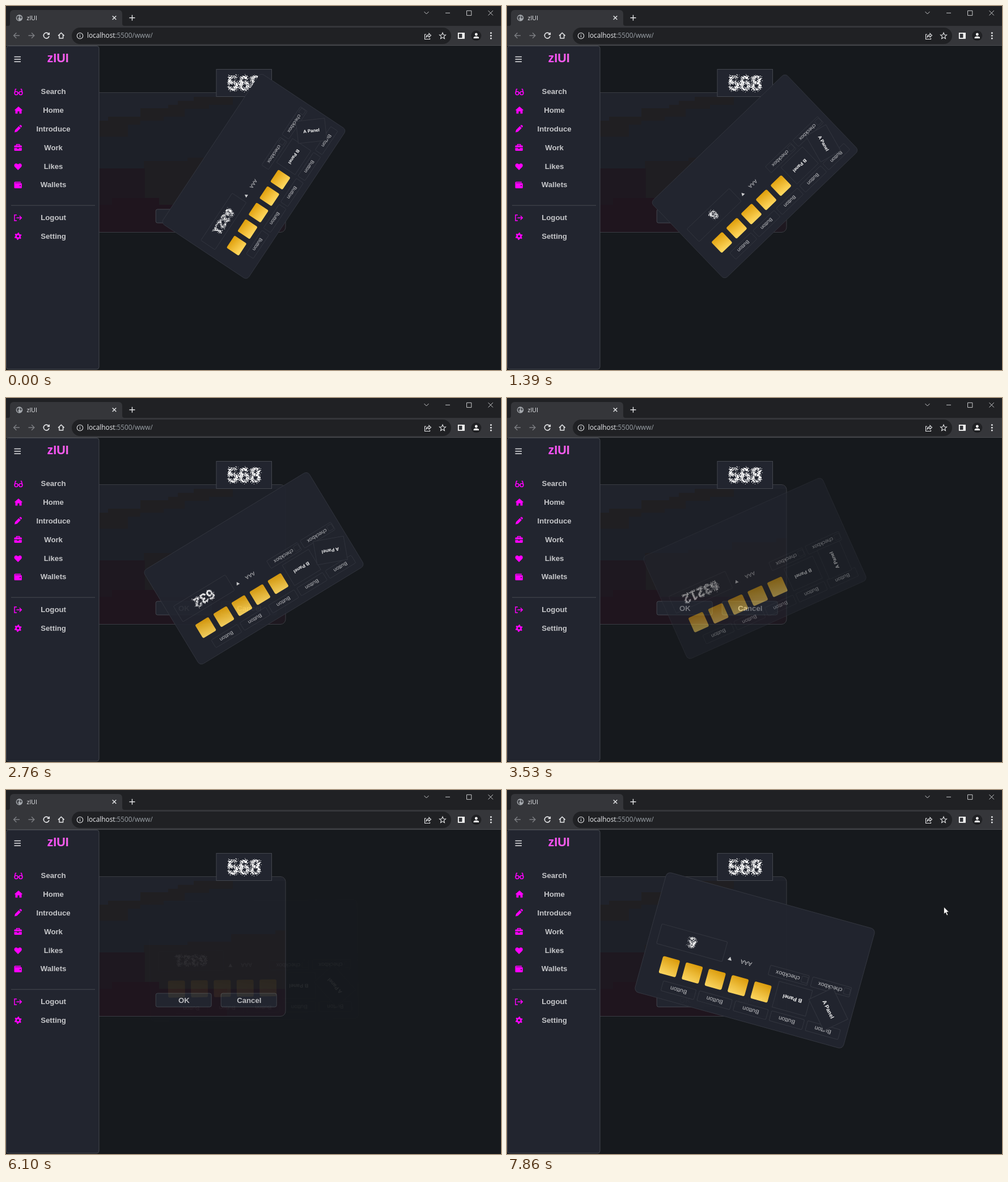
Write an HTML page that moves like this. It is 873 by 641 pixels and loops after 8000 ms.

```html
<!DOCTYPE html>
<html lang="en">
<head>
<meta charset="utf-8">
<title>zIUI</title>
<style>
  html, body { margin: 0; width: 100%; height: 100%; overflow: hidden; background: #16191d; }
  svg { display: block; width: 873px; height: 641px; font-family: "Liberation Sans", Arial, sans-serif; }
  text { text-anchor: middle; dominant-baseline: central; fill: #c6c7ca; }
  .bold { font-weight: bold; }
  .ui { font-family: "Open Sans", "Noto Sans", sans-serif; text-anchor: start; dominant-baseline: auto; }
  .panel { fill: #22252f; stroke: #43464e; }
  .thin { fill: #22252f; stroke: #343740; }
  .line { fill: none; stroke: #e3e4e6; stroke-width: 1.4; }
  .pink { fill: #f0f; }
  .pinkline { fill: none; stroke: #f0f; stroke-width: 1.5; }
  .digits { fill: #fff; font-weight: bold; filter: url(#grain); }
</style>
</head>
<body>
<svg viewBox="0 0 873 641" xmlns="http://www.w3.org/2000/svg">
  <defs>
    <filter id="grain" x="-30%" y="-30%" width="160%" height="160%" color-interpolation-filters="sRGB">
      <feTurbulence type="fractalNoise" baseFrequency="0.9" numOctaves="2" seed="4"/>
      <feDisplacementMap in="SourceGraphic" scale="13" xChannelSelector="R" yChannelSelector="G"/>
    </filter>
    <linearGradient id="gold" x1="0.3" y1="1" x2="0.5" y2="0">
      <stop offset="0" stop-color="#e0a00c"/><stop offset="1" stop-color="#ffd75e"/>
    </linearGradient>
    <linearGradient id="title">
      <stop offset="0" stop-color="#fb4dfb"/><stop offset="1" stop-color="#f662ea"/>
    </linearGradient>
    <clipPath id="dialogClip"><rect x="100" y="153" width="393" height="245" rx="9"/></clipPath>
  </defs>

  <rect width="873" height="641" fill="#16191d"/>

  <!-- dialog -->
  <g clip-path="url(#dialogClip)">
    <rect x="100" y="153" width="393" height="245" fill="#1d2028"/>
    <path d="M100 153H493V160H331V167H303V174H286V180H237V195H180V202H100Z" fill="#20232c"/>
    <path d="M100 202H180V195H237V180H286V174H303V167H331V160H400V174H358V181H315V195H278V202H237V209H215V230H100Z" fill="#201f22"/>
    <path d="M243 273H320V267H397V254H475V247H493V398H243Z" fill="#1f1e22"/>
    <path d="M100 286H245V350H493V398H100Z" fill="#1e1820"/>
    <path d="M100 350H187V338H270V350H390V398H100Z" fill="#1f151e"/>
  </g>
  <rect x="100" y="152.5" width="393" height="246" rx="9" fill="none" stroke="#3a3c42"/>
  <g id="dialogButtons"></g>
  <rect class="panel" x="371" y="111.5" width="97.5" height="48"/>
  <text class="digits" x="420" y="136.5" font-size="36">568</text>

  <g id="card">
    <rect class="thin" x="-190.75" y="-109.25" width="381.5" height="218.5" rx="8"/>
    <g id="cardParts" font-size="10.4"></g>
    <text id="typed" class="digits" x="115" y="1" font-size="26.5"></text>
    <path d="M39.4-11.6H46.6L43-5.4Z" fill="#d0d1d3"/>
    <g id="spinner" class="bold" font-size="9.6">
      <rect class="thin" x="-30.5" y="-23.5" width="61" height="47"/>
      <text style="fill:#fff">A Panel</text>
    </g>
  </g>

  <!-- sidebar -->
  <rect class="panel" x="0.5" y="70.5" width="163.5" height="569" rx="4"/>
  <path class="line" d="M14.5 89.5H26M14.5 93.8H26M14.5 98H26"/>
  <text class="bold" x="91.7" y="92" font-size="21.5" style="fill:url(#title)">zIUI</text>
  <path d="M9 351.2H157" stroke="#474a52"/>
  <g id="menu" class="bold" font-size="13.2"></g>
  <g class="pinkline">
    <circle cx="18" cy="153.5" r="2.9"/><circle cx="26" cy="153.5" r="2.9"/>
    <path d="M15.2 153L16.6 146.6H18.4M28.8 153L27.4 146.6H25.6M20.8 153H23.2"/>
    <path d="M19 368H15V378H19M18.5 373H27M23.8 369.5L27.3 373L23.8 376.5"/>
  </g>
  <g class="pink">
    <path d="M22 177L29.4 183.6H27.5V189.5H23.6V185.5H20.4V189.5H16.5V183.6H14.6Z"/>
    <path d="M15 222.5L16 218.2L22.6 211.6L25.9 214.9L19.3 221.5ZM23.5 210.7L24.8 209.6Q25.8 209 26.8 210L27.5 210.8Q28.4 211.7 27.6 212.8L26.7 214Z"/>
    <path d="M14.5 249V246.8Q14.5 245.6 15.8 245.6H17.8V244Q17.8 243 18.8 243H23.6Q24.6 243 24.6 244V245.6H26.5Q27.8 245.6 27.8 246.8V249ZM19.2 244.4V245.6H23.2V244.4ZM14.5 250H19.4V251.3H22.8V250H27.8V253.8Q27.8 255 26.5 255H15.8Q14.5 255 14.5 253.8Z" fill-rule="evenodd"/>
    <path d="M21.2 289L15.6 283.4C13.4 280.8 15 277.2 18 277.2Q20 277.2 21.2 279Q22.4 277.2 24.4 277.2C27.4 277.2 29 280.8 26.8 283.4Z"/>
    <path d="M16 309.5H26V311.2H16.2V312H26.4Q27.8 312 27.8 313.3V319.7Q27.8 321 26.4 321H16Q14.5 321 14.5 319.5V311Q14.5 309.5 16 309.5Z"/>
    <g id="gear"></g>
  </g>
  <circle cx="25" cy="316.3" r="1" fill="#22252f"/>
  <circle cx="21.2" cy="405.5" r="2.1" fill="#22252f"/>

  <!-- browser window -->
  <rect width="873" height="36" fill="#202124"/>
  <path d="M0 35H4Q7 35 7 31V14Q7 7 14 7H198Q205 7 205 14V31Q205 35 209 35H873V70H0Z" fill="#35363a"/>
  <path d="M0 69.5H873" stroke="#4a4c50"/>
  <circle cx="23.5" cy="21" r="5.8" fill="#a4a8ad"/>
  <path d="M19 18.6L23 17.2L23.6 19.4L21.6 21.8L22.4 25.8Q18.3 23.5 19 18.6ZM25.2 17L28 20L26.3 22.6L24.6 20.8Z" fill="#45474b"/>
  <text class="ui" x="36.5" y="25.2" font-size="10.5" style="fill:#e8eaed">zIUI</text>
  <g class="line">
    <path d="M187.7 17.5L194.3 24.1M194.3 17.5L187.7 24.1M217.5 20.8H227.5M222.5 15.8V25.8"/>
    <path d="M737.5 10L741.5 14L745.5 10M775 12.3H783M812.5 8.3H820.8V16.6H812.5ZM850.5 8.2L858.8 16.5M858.8 8.2L850.5 16.5" stroke-width="1" stroke="#c9cacc"/>
    <path d="M24 52H13.8M18.4 47.2L13.6 52L18.4 56.8M39.5 52H49.7M45.1 47.2L49.9 52L45.1 56.8" stroke="#7c7e82"/>
    <path d="M75.3 49.3A4.9 4.9 0 1 0 76 53M76.3 46.7V50.3H72.6" stroke-width="1.6"/>
    <path d="M92 52.4L97.3 47.2L102.6 52.4M94 51V56.8H100.6V51" stroke-width="1.5"/>
  </g>
  <rect x="116" y="38" width="669" height="29" rx="14.5" fill="#202124"/>
  <circle class="line" cx="130.5" cy="52.5" r="5.2" stroke="#aeb1b5" style="stroke-width:1.1"/>
  <path d="M130.5 51.5V55.5M130.5 49.3V50.5" stroke="#c4c7ca" stroke-width="1.2"/>
  <text class="ui" x="143" y="56.4" font-size="11.8" style="fill:#9aa0a6"><tspan fill="#eceef0">localhost</tspan>:5500/www/</text>
  <g class="line" style="stroke-width:1.1">
    <path d="M741 50H738.5V58.5H747.5V56.5M741 55Q741.4 50.8 746 50.6V48.3L749.5 51.7L746 55V53Q742.8 52.8 741 55Z"/>
    <path id="star"/>
    <path d="M797.8 47.8H808V56.8H797.8Z" stroke="#fff" style="stroke-width:1.8"/>
  </g>
  <path d="M804.5 47.5H808V57H804.5Z" fill="#fff"/>
  <circle cx="829.3" cy="52.3" r="9" fill="#202124"/>
  <circle cx="829.3" cy="50" r="2.4" fill="#fff"/>
  <path d="M824.6 57V55.8Q825 53.4 829.3 53.4T834 55.8V57Z" fill="#fff"/>
  <g fill="#e3e4e6"><circle cx="855.3" cy="47.5" r="1.5"/><circle cx="855.3" cy="52.3" r="1.5"/><circle cx="855.3" cy="57.1" r="1.5"/></g>

  <path id="cursor" d="M0 0V12.5L2.9 9.8L5.2 14.8L7.3 13.9L5 9H9Z" fill="#fff" stroke="#111" stroke-width="0.7"/>
</svg>
<script>
const $ = id => document.getElementById(id);
const LOOP = 8000, STEP = 196, STEP_TIME = 0.1965;
const CODE = '63212';

const box = (x, y, w, h, cls, r = 2) =>
  `<rect class="${cls}" x="${x - w / 2}" y="${y - h / 2}" width="${w}" height="${h}" rx="${r}"/>`;
const label = (x, y, text, attrs = '') => `<text x="${x}" y="${y}" ${attrs}>${text}</text>`;
const ring = (n, cx, cy, radius) => 'M' + Array.from({ length: n }, (_, i) => {
  const a = i / n * 2 * Math.PI - Math.PI / 2;
  return [cx + radius(i) * Math.cos(a), cy + radius(i) * Math.sin(a)].map(v => v.toFixed(1)).join(' ');
}).join('L') + 'Z';

function buildStatic() {
  $('dialogButtons').innerHTML = [[313.2, 'OK'], [428.2, 'Cancel']].map(([x, text]) =>
    box(x, 370, 98, 24, 'panel', 3) + label(x + 0.6, 370.8, text, 'class="bold" font-size="13.2"')).join('');

  const items = { Search: 150, Home: 183, Introduce: 216, Work: 249, Likes: 282, Wallets: 314.5, Logout: 372, Setting: 405 };
  $('menu').innerHTML = Object.entries(items).map(([text, y]) => label(83.6, y, text)).join('');

  $('gear').innerHTML = `<path d="${ring(24, 21.2, 405.5, i => i % 4 < 2 ? 6.5 : 4.7)}"/>`;
  $('star').setAttribute('d', ring(10, 770, 52.8, i => i % 2 ? 2.5 : 5.8));

  let parts = box(115, 0.5, 120, 36, 'thin') + label(13.5, -8.3, 'AAA');
  for (let i = 0; i < 5; i++) {
    const bx = 115.6 - 66 * i;
    parts += box(142.3 - 41.95 * i, -50.8, 31, 31, '', 3).replace('class=""', 'fill="url(#gold)"');
    parts += box(bx, -86.5, 60, 18, 'thin') + label(bx, -86.5, 'Button');
  }
  for (const x of [-64.8, -142.2])
    parts += box(x, -9.4, 71, 17.5, 'thin') + box(x - 29, -9.4, 11, 11, 'thin') + label(x + 1.6, -9.8, 'checkbox');
  parts += box(-81.8, -47.5, 61, 47, 'thin', 0) +
    label(-81.8, -47.5, 'B Panel', 'class="bold" font-size="9.6" style="fill:#fff"');
  $('cardParts').innerHTML = parts;
}

// Spinner keys: seconds, degrees, degrees per second.
const spin = [[0, 230, 30], [1.375, 284, 52], [2.75, 381, 82], [3.54, 451, 98], [6.88, 861, 105], [7.86, 949, 80]];

function spinAngle(t) {
  const i = Math.min(spin.length - 2, spin.findLastIndex(k => k[0] <= t));
  const [t0, a, va] = spin[i], [t1, b, vb] = spin[i + 1];
  const d = t1 - t0, x = (t - t0) / d;
  return a + d * va * x * (1 - x) ** 2 + (b - a) * x * x * (3 - 2 * x) - d * vb * x * x * (1 - x);
}

function cardOpacity(t, step) {
  if (step >= 23 && step < 31) return 0;
  const x = Math.min(1, Math.max(0, (Math.abs(t - 5.22) - 0.5) / 2.35));
  return x * x * (3 - 2 * x);
}

function render(ms) {
  const step = Math.min(40, Math.floor(ms / STEP));
  const t = step * STEP_TIME;
  const angle = 123.6 + 9.14 * t;
  const scale = 0.8313 + 0.02145 * t;
  $('card').setAttribute('transform', `translate(437 300) rotate(${angle}) scale(${scale})`);
  $('card').setAttribute('opacity', cardOpacity(t, step));
  $('spinner').setAttribute('transform', `translate(-148 -48.5) rotate(${spinAngle(t)})`);

  const count = (4 + Math.floor((t + 0.195) / 0.51)) % 6;
  $('typed').textContent = CODE.slice(0, count);

  const move = Math.min(1, (step - 38) / 2);
  $('cursor').setAttribute('visibility', move >= 0 ? 'visible' : 'hidden');
  $('cursor').setAttribute('transform', `translate(${826 - 55.5 * move} ${2 + 204 * move})`);
}

buildStatic();
const start = performance.now();
function tick() {
  render((performance.now() - start) % LOOP);
  requestAnimationFrame(tick);
}
tick();
</script>
</body>
</html>
```
